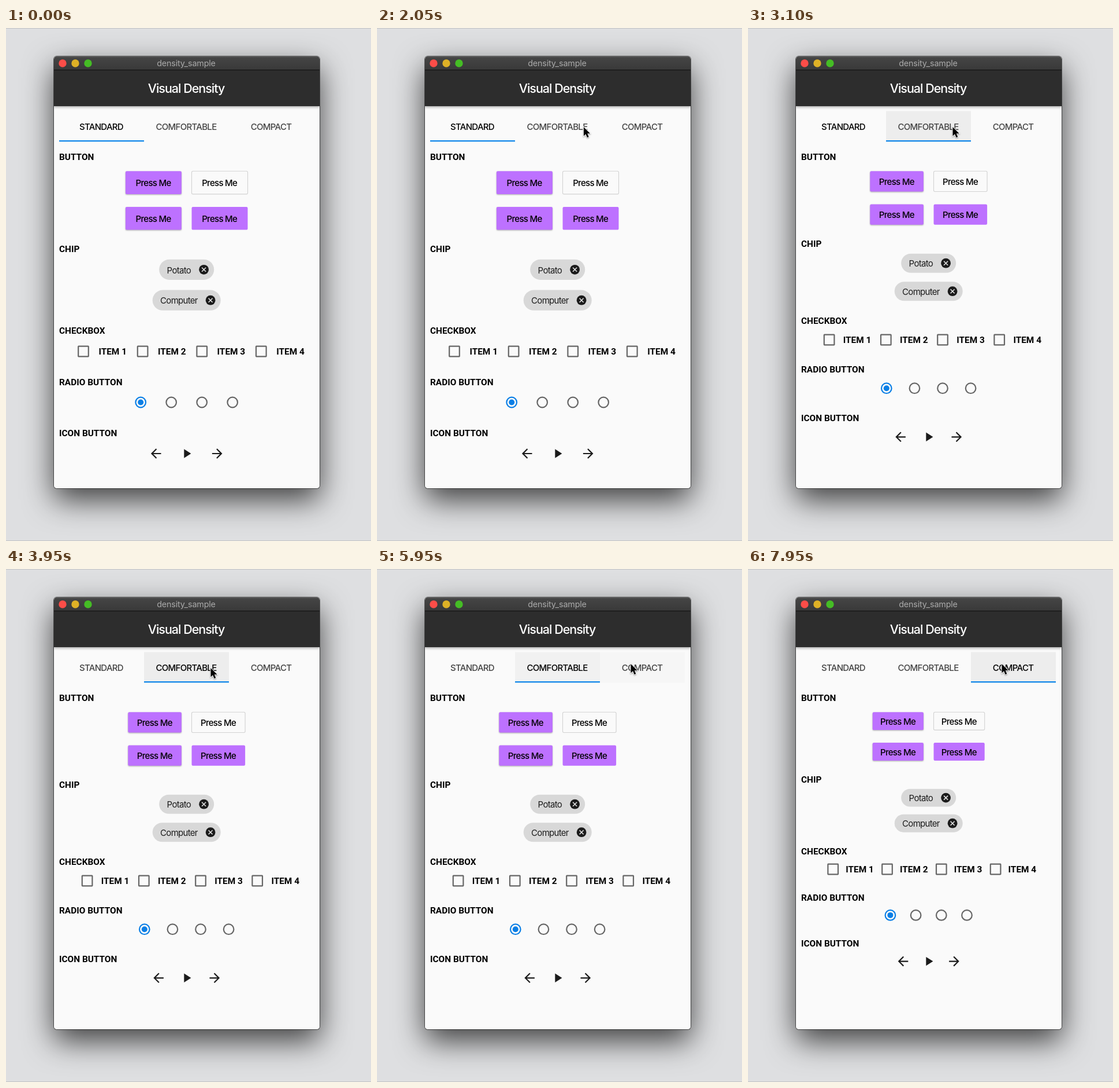
Recreate the animation shown at these times as an HTML page. Size 632 px wide and 886 px high, loop 8 s.

```html
<!DOCTYPE html>
<html lang="en">
<head>
<meta charset="utf-8">
<title>Visual Density</title>
<style>
html, body { margin: 0; width: 100%; height: 100%; overflow: hidden; background: #dedfe1; }
body { position: relative; }
#edge { position: absolute; inset: 0; border: solid #c2c3c5; border-width: 1px 0; }
#win { position: absolute; left: 83px; top: 49px; width: 460px; height: 746px; border-radius: 5px; background: #fafafa; overflow: hidden; }
#glow { position: absolute; left: 83px; top: 49px; width: 460px; height: 746px; border-radius: 5px;
  box-shadow: 0 0 0 1px rgba(0,0,0,.55), 0 20px 52px rgba(0,0,0,.72); }
#bar { height: 23px; background: linear-gradient(#464646, #393939); box-shadow: inset 0 1px #686868; border-bottom: 1px solid #111; }
#app { height: 62px; background: #2d2d2d; box-shadow: 0 2px 4px rgba(0,0,0,.3); }
svg { position: absolute; left: 0; top: 0; }
text { font: 500 15px Inter, sans-serif; letter-spacing: -.047em; }
.mid { text-anchor: middle; }
.head { font: 700 15.4px Roboto, sans-serif; letter-spacing: 0; }
.chip { font-weight: 400; }
.raised { filter: drop-shadow(0 1.5px 1.2px rgba(0,0,0,.32)); }
.ring { fill: none; stroke: #666; stroke-width: 2.2; }
.on { stroke: #0b7fe6; }
</style>
</head>
<body>
<div id="edge"></div>
<div id="glow"></div>
<div id="win"><div id="bar"></div><div id="app"></div></div>
<svg width="632" height="886">
  <circle cx="98" cy="61" r="6.7" fill="#fc4d48"/>
  <circle cx="120" cy="61" r="6.7" fill="#deb126"/>
  <circle cx="142" cy="61" r="6.7" fill="#45bd25"/>
  <text class="mid" x="312" y="66" fill="#aaa" style="font-size:14.3px;font-weight:400;letter-spacing:-.01em">density_sample</text>
  <text class="mid" x="312" y="111.5" fill="#fff" style="font-size:21.5px">Visual Density</text>
  <g id="page"></g>
  <g id="cursor">
    <path d="M0 0V15.6L3.6 12.3L6.1 18.2L8.8 17L6.3 11.3H11.2Z" stroke="#fff" stroke-width="1.6" paint-order="stroke" style="filter:drop-shadow(0 1px 1px rgba(0,0,0,.4))"/>
  </g>
</svg>
<script>
const LOOP = 8000, STEP = 50, MID = 312.7;
const TABS = ['STANDARD', 'COMFORTABLE', 'COMPACT'];
const page = document.getElementById('page');
const cursor = document.getElementById('cursor');

const ramp = (t, start, length) => Math.min(1, Math.max(0, (t - start) / length));
const settle = (from, to, p, power) => to + (from - to) * (1 - p) ** power;
const range = n => [...Array(n).keys()];

const text = (x, y, s, cls = '', fill = '#000') =>
  `<text x="${x}" y="${y}" class="${cls}" fill="${fill}">${s}</text>`;
const rect = (x, y, w, h, fill, r = 0, more = '') =>
  `<rect x="${x}" y="${y}" width="${w}" height="${h}" rx="${r}" fill="${fill}" ${more}/>`;
const icon = (x, y, d) =>
  `<path transform="translate(${x} ${y}) scale(1.1) translate(-12 -12)" d="${d}" fill="#1b1b1b"/>`;

function tabs(active, hover, label) {
  return TABS.map((name, i) => {
    const x = 92 + 147 * i;
    const grey = Math.round(68 * (1 - label[i]));
    return rect(x, 143.5, 147, 53, '#ededed', 0, `opacity="${hover[i]}"`) +
      (i === active ? rect(x, 194, 147, 2.2, '#0e86ea') : '') +
      text(x + 73, 175.6, name, 'mid', `rgb(${grey},${grey},${grey})`);
  }).join('');
}

function button(col, row, d) {
  const w = 97 - 4.4 * d, h = 39.7 - 4.4 * d;
  const x = col ? MID + 8.8 : MID - 8.8 - w, y = 247.2 + row * (h + 22);
  const box = col && !row
    ? rect(x, y, w, h, 'none', 2.2, 'stroke="#d2d2d2" stroke-width="1.1"')
    : rect(x, y, w, h, '#bd71ff', 2.2, col ? '' : 'class="raised"');
  return box + text(x + w / 2 - .3, y + h / 2 + 6.2, 'Press Me', 'mid');
}

function chip(name, w, y, d) {
  const h = 35.3 - 2.2 * d, x = MID - w / 2, cx = x + w - 17.6;
  return rect(x, y - h / 2, w, h, '#d8d8d8', h / 2) +
    text(x + 13.4, y + 6.2, name, 'chip', '#1b1b1b') +
    `<circle cx="${cx}" cy="${y}" r="8.4" fill="#1b1b1b"/>` +
    `<path d="M${cx - 3.5} ${y - 3.5}l7 7m0-7l-7 7" stroke="#e4e4e4" stroke-width="1.6"/>`;
}

// d is the density level: 0 standard, 1 comfortable, 2 compact
function controls(d) {
  const heads = [['BUTTON', 223, 0], ['CHIP', 382, 9], ['CHECKBOX', 523, 17.6],
    ['RADIO BUTTON', 611.5, 22], ['ICON BUTTON', 700, 26.5]];
  const checkY = 558.5 - 20 * d, radioY = 646.5 - 24.3 * d, iconY = 735 - 28.7 * d;
  const gap = 53 - 4.4 * d;
  return heads.map(([s, y, k]) => text(92, y - k * d + 5.4, s, 'head')).join('') +
    range(4).map(i => button(i % 2, i >> 1, d)).join('') +
    chip('Potato', 95, 417.3 - 11.1 * d, d) +
    chip('Computer', 118, 470.2 - 15.5 * d, d) +
    range(4).map(i => {
      const x = 134 + 6.6 * d + i * (102.6 - 4.4 * d);
      const rx = 233.2 + 6.6 * d + i * gap;
      return rect(x - 8.8, checkY - 8.8, 17.6, 17.6, 'none', .6, 'class="ring"') +
        text(x + 26.4 - 2.2 * d, checkY + 5.4, 'ITEM ' + (i + 1), 'head') +
        `<circle cx="${rx}" cy="${radioY}" r="8.8" class="ring ${i ? '' : 'on'}"/>` +
        (i ? '' : `<circle cx="${rx}" cy="${radioY}" r="5" fill="#0b7fe6"/>`);
    }).join('') +
    icon(MID - gap, iconY, 'M20 11H7.8l5.6-5.6L12 4l-8 8 8 8 1.4-1.4L7.8 13H20z') +
    icon(MID, iconY, 'M8 5v14l11-7z') +
    icon(MID + gap, iconY, 'M12 4l-1.4 1.4 5.6 5.6H4v2h12.2l-5.6 5.6L12 20l8-8z');
}

function draw(t) {
  const level = t < 3100 ? 0 : t < 6150 ? 1 : 2;
  const over1 = ramp(t, 2900, 150), over2 = ramp(t, 5900, 150);
  const mark1 = ramp(t, 3100, 150), mark2 = ramp(t, 6150, 200);
  page.innerHTML =
    tabs(level, [0, over1 - over2, over2], [1 - mark1, mark1 - mark2, mark2]) + controls(level);

  const a = ramp(t, 1550, 650), b = ramp(t, 4900, 700);
  const x = b ? settle(354.5, 439.5, b, 1.9) : settle(629.5, 354.5, a, 3);
  const y = b ? settle(171, 164, b, 7) : settle(207.5, 171, a, 7);
  cursor.setAttribute('transform', `translate(${x} ${y})`);
  cursor.style.display = t < 1400 ? 'none' : '';
}

let last = -1;
function tick() {
  const t = Math.floor(performance.now() % LOOP / STEP) * STEP;
  if (t !== last) draw(last = t);
  requestAnimationFrame(tick);
}
tick();
</script>
</body>
</html>
```
